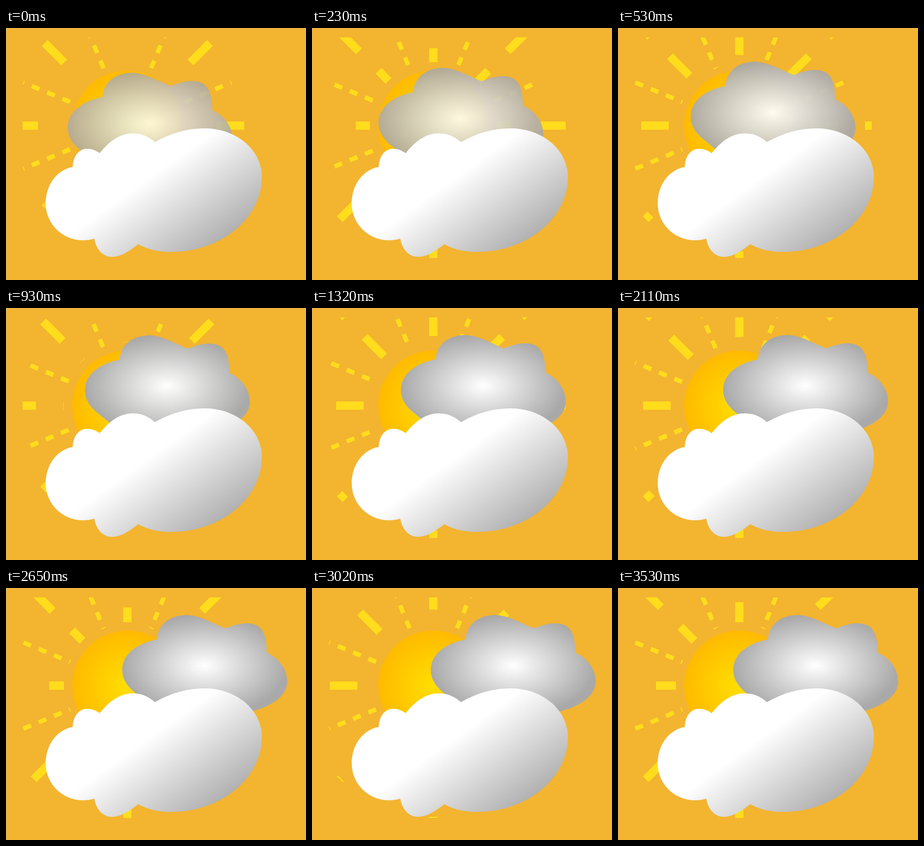
Animation, 544 px wide and 457 px high, one loop 3.63 s. Source, as an HTML page:

```html
<!DOCTYPE html>
<html lang="en">
<head>
<meta charset="utf-8">
<title>Sun and clouds</title>
<style>
  html, body { margin: 0; width: 100%; height: 100%; overflow: hidden; background: #f3b430; }
  svg { display: block; width: 544px; height: 457px; }
  .wide { stroke-width: 15; stroke-dasharray: 50 50; }
  .slim { stroke-width: 8; stroke-dasharray: 15 15; }
</style>
</head>
<body>
<svg viewBox="0 0 544 457">
  <defs>
    <radialGradient id="sunFill">
      <stop offset="0" stop-color="#ffdf00"/>
      <stop offset="1" stop-color="#ffba00"/>
    </radialGradient>
    <radialGradient id="greyFill" gradientUnits="userSpaceOnUse" cx="0" cy="0" r="1"
      gradientTransform="translate(310 141) scale(150 92)">
      <stop offset="0" stop-color="#fff"/>
      <stop offset="1" stop-color="#a9a9a9"/>
    </radialGradient>
    <linearGradient id="whiteFill" gradientUnits="userSpaceOnUse" x1="272" y1="262" x2="374" y2="404">
      <stop offset="0" stop-color="#fff"/>
      <stop offset="1" stop-color="#aeaeae"/>
    </linearGradient>
    <clipPath id="frame"><path d="M30 17H544V457H30Z"/></clipPath>
  </defs>

  <path d="M.5 457V.5H544" fill="none" stroke="#e3b456"/>
  <g clip-path="url(#frame)">
    <g id="rays" transform="translate(220 177)" stroke="#ffdd1c"></g>
  </g>
  <circle cx="220" cy="177" r="100" fill="url(#sunFill)"/>

  <path id="grey" fill="url(#greyFill)" d="M224 93C226 64 250 49 278 49C304 50 326 65 348 73
    C364 67 375 64 386 64C414 64 423 82 423 117C445 127 460 147 460 170
    C460 193 437 211 405 221C370 233 300 236 250 228C225 222 203 207 187 192
    C172 181 161 166 161 149C161 118 190 100 224 93Z"/>

  <path fill="url(#whiteFill)" d="M121 252C122 231 133 219 147 219C156 219 163 222 170 227
    C188 204 208 191 230 191C246 191 259 197 270 207C300 190 329 182 360 182
    C418 182 464 221 464 270C464 345 390 406 300 406C277 406 257 402 240 392
    C223 405 208 415 193 415C175 415 164 402 160 382C154 384 147 385 140 385
    C102 385 72 355 72 318C72 285 92 257 121 252Z"/>
</svg>
<script>
const LOOP = 3630;
const rays = document.getElementById('rays');
const grey = document.getElementById('grey');

function addRays(name, from, to, start, step) {
  const group = document.createElementNS(rays.namespaceURI, 'g');
  group.setAttribute('class', name);
  for (let a = start; a < 360; a += step) {
    const line = document.createElementNS(rays.namespaceURI, 'line');
    line.setAttribute('x1', from);
    line.setAttribute('x2', to);
    line.setAttribute('transform', `rotate(${a})`);
    group.append(line);
  }
  rays.append(group);
  return group;
}
const wide = addRays('wide', 115, 240, 0, 45);
const slim = addRays('slim', 112, 204, 22.5, 45);

// The picture advances in held steps: [first, last, count].
const spans = [
  [130, 630, 6], [730, 1250, 6], [1320, 1320, 1], [1440, 1820, 5], [1920, 2110, 3],
  [2250, 2650, 5], [2720, 2720, 1], [2810, 3020, 3], [3120, 3320, 3], [3440, 3530, 2]
];
const ticks = [0];
for (const [a, b, n] of spans)
  for (let i = 0; i < n; i++) ticks.push(n > 1 ? a + (b - a) * i / (n - 1) : a);

const clamp = v => Math.min(1, Math.max(0, v));
const TURN = 2837;

function draw(t) {
  wide.style.strokeDashoffset = 53 - 0.1244 * t;
  const sway = clamp(0.5 - 0.75 * Math.cos(2 * Math.PI * t / 1010));
  slim.style.strokeDashoffset = 119.5 - 16.5 * sway;

  const x = t < TURN ? 0.0373 * t - 49 : 56.8 - 0.0127 * (t - TURN);
  const rise = clamp(t / 850);
  grey.setAttribute('transform', `translate(${x} ${32 * (1 - rise)})`);
  grey.setAttribute('opacity', 0.83 + 0.17 * rise);
}

const begin = performance.now();
function tick() {
  const now = (performance.now() - begin) % LOOP;
  draw(ticks.findLast(t => t <= now + 0.5));
  requestAnimationFrame(tick);
}
tick();
</script>
</body>
</html>
```
